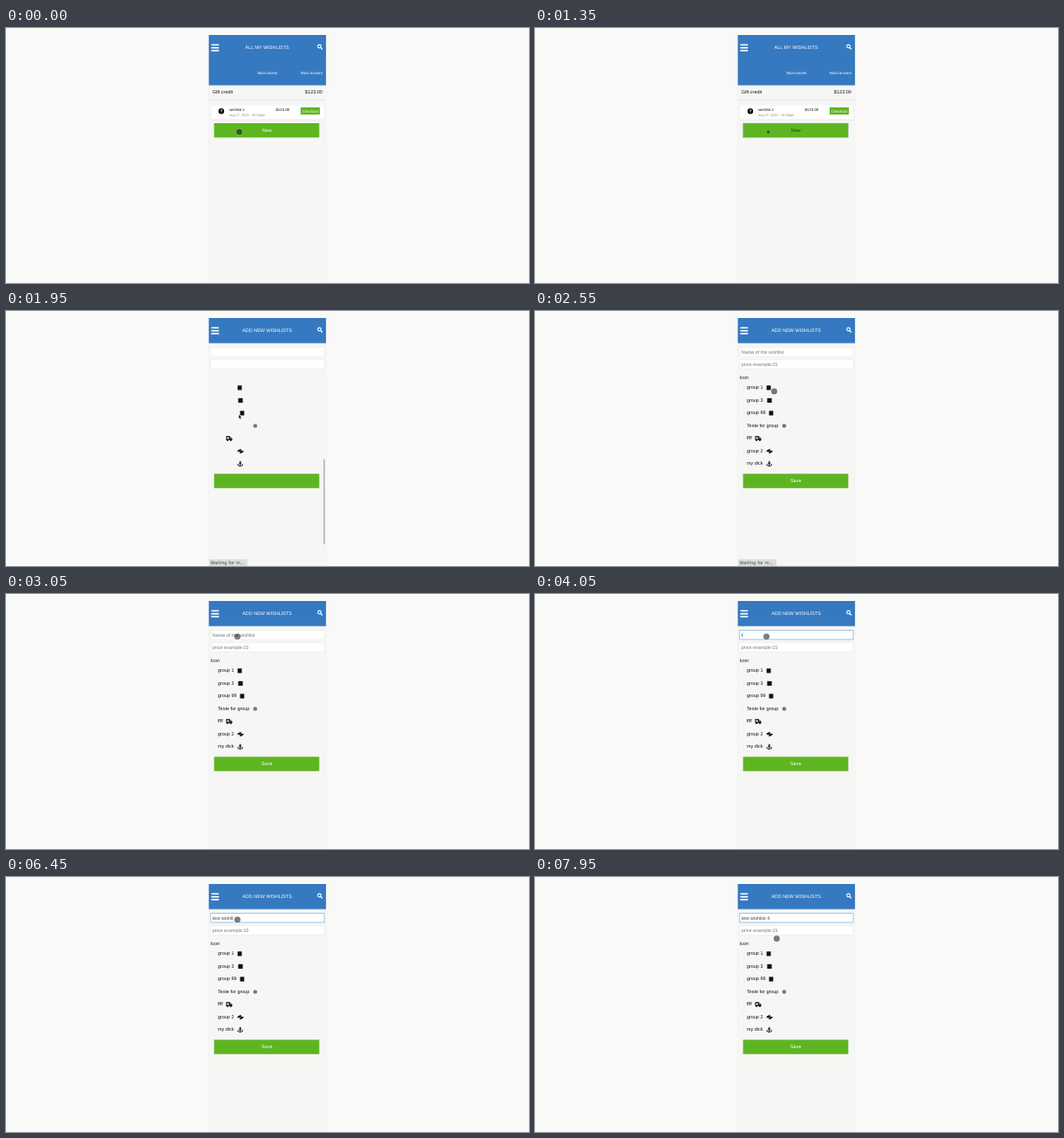
Write an HTML page that moves like this. It is 600 px wide and 292 px high and loops after 8 s.

```html
<!DOCTYPE html>
<html lang="en">
<head>
<meta charset="utf-8">
<title>Wishlists</title>
<style>
  html, body { margin: 0; width: 100%; height: 100%; overflow: hidden; background: #f9f9f7; }
  svg { display: block; width: 600px; height: 292px; }
  text { font-family: "Liberation Sans", Arial, sans-serif; white-space: pre; text-rendering: geometricPrecision; }
</style>
</head>
<body>
<svg id="stage" viewBox="0 0 600 292" xmlns="http://www.w3.org/2000/svg"></svg>
<script>
const LOOP = 8000, FONT = 5.48;
const BLUE = '#3679c1', GREEN = '#5eb522', PAGE = '#f6f6f4', INK = '#111';

const rect = (x, y, w, h, fill, more = '') =>
  `<rect x="${x}" y="${y}" width="${w}" height="${h}" fill="${fill}" ${more}/>`;
const text = (x, y, str, fill = INK, size = FONT, more = '') =>
  `<text x="${x}" y="${y}" font-size="${size}" fill="${fill}" ${more}>${str}</text>`;
const centred = 'text-anchor="middle"';
const toRight = 'text-anchor="end"';

// Icons are drawn around their own centre
const icons = {
  square: rect(-2.4, -2.6, 4.8, 5.2, INK),
  wide: rect(-2.6, -2.6, 5.2, 5.2, INK),
  ring: '<circle r="2.3" fill="#777"/>',
  ambulance: `<path d="M-3.7-2.7H.8V-1.5H2L3.4 0V1.8H-3.7Z" fill="${INK}"/>
    <path d="M-1.5-2V1M-3 -.5H0" stroke="#fff" stroke-width=".8"/>
    <path d="M1.2-.8H1.8L2.6 .1H1.2Z" fill="#fff"/>
    <circle cx="-2" cy="1.9" r="1" fill="${INK}"/><circle cx="1.8" cy="1.9" r="1" fill="${INK}"/>`,
  hands: `<g fill="none" stroke="${INK}" stroke-width="1" stroke-linecap="round">
    <path d="M-3.2 .3L-1.6-1.5L.3-2.1M-1.2-.9L.6-.9M-1.6 0L.1 .3M3.2-.3L1.6 1.5L-.3 2.1M1.2 .9L-.4 1.2M1.6 0L.6-.2"/>
    <circle cx="-1.9" cy="-.4" r=".8" fill="${INK}"/><circle cx="1.9" cy=".4" r=".8" fill="${INK}"/></g>`,
  anchor: `<g fill="none" stroke="${INK}" stroke-width=".95">
    <circle cy="-2" r=".8"/><path d="M0-1.2V2.5M-1.5-.3H1.5M-2.7 .8C-2.4 3.1 2.4 3.1 2.7 .8"/></g>
    <path d="M-3.4 1.3L-2.6-.2L-1.6 1.3ZM3.4 1.3L2.6-.2L1.6 1.3Z" fill="${INK}"/>`
};

const rows = [
  ['group 1', 'square', 268.1], ['group 3', 'wide', 269],
  ['group 99', 'square', 270.9], ['Teste for group', 'ring', 285.9],
  ['ffff', 'ambulance', 256.2], ['group 2', 'hands', 269], ['my dick', 'anchor', 268.7]
];
const rowY = i => 87.7 + 14.53 * i;

const header = (title, h) =>
  rect(232.7, 8, 134.4, h, BLUE, 'filter="url(#soft)"') +
  [18.4, 21.7, 25].map(y => rect(235.5, y, 8.8, 1.7, '#fff', 'rx=".5"')).join('') +
  text(299.6, 24.2, title, '#fff', FONT, centred) +
  `<g fill="none" stroke="#fff"><circle cx="359.6" cy="21" r="1.9" stroke-width="1.1"/>
   <path d="M361 22.4L362.6 24" stroke-width="1.3" stroke-linecap="round"/></g>`;

const listPage =
  rect(232.7, 65, 134.4, 16.8, PAGE, 'filter="url(#soft)"') +
  header('ALL MY WISHLISTS', 57.5) +
  text(288.4, 52.5, 'Most recent', '#fff', 4.4) +
  text(363, 52.5, 'Most ancient', '#fff', 4.4, toRight) +
  text(236.8, 75.3, 'Gift credit') +
  text(362.9, 75.3, '$123.00', INK, FONT, toRight) +
  rect(235.6, 88.6, 129, 16, '#fff', 'filter="url(#soft)"') +
  '<circle cx="247" cy="95.3" r="3.2" fill="#000"/>' +
  text(247, 97.2, '?', '#fff', 5.2, centred + ' font-weight="bold"') +
  text(256.2, 95.2, 'wishlist z', INK, 4.4) +
  text(256.2, 100.7, 'aug 27, 2020 - 04:00pm', '#8a8a8a', 3.87) +
  text(309.4, 95.3, '$123.00', INK, 4.4) +
  rect(338, 90.8, 22, 8.3, GREEN) +
  text(349, 96.5, 'Checkout', '#fff', 4.4, centred) +
  rect(238.7, 109, 120.7, 16.4, GREEN, 'id="newBtn"') +
  text(299.2, 119, 'New', '#fff', FONT, centred + ' id="newText"');

const field = (y, id) =>
  rect(234.8, y, 130.3, 10.4, '#fff', `id="${id}" stroke="#e6e6e4" stroke-width=".5"`);

const formPage =
  rect(232.7, 37, 134.4, 255, PAGE) +
  field(41.6, 'nameBox') + field(55.9, 'priceBox') +
  rows.map(([, icon, x], i) =>
    rect(234.9, rowY(i) - 1.9, 4.1, 4.1, '#fcfcfc', 'stroke="#dededc" stroke-width=".4" rx=".5"') +
    `<g transform="translate(${x} ${rowY(i) + .2})">${icons[icon]}</g>`).join('') +
  rect(238.7, 186.4, 120.7, 16.4, GREEN);

const formText =
  text(236.7, 62.9, 'price example:15', '#777') +
  text(234.8, 77.6, 'Icon') +
  rows.map(([label], i) => text(242.9, rowY(i) + 1.6, label)).join('') +
  text(299.2, 196.4, 'Save', '#fff', FONT, centred);

document.getElementById('stage').innerHTML = `
  <defs>
    <filter id="soft" x="-5%" y="-20%" width="110%" height="150%">
      <feDropShadow dx="0" dy=".4" stdDeviation=".7" flood-color="#000" flood-opacity=".16"/>
    </filter>
    <clipPath id="cut"><rect id="cutBox" x="232" y="0" width="136" height="292"/></clipPath>
  </defs>
  ${rect(0, 0, 600, 292, '#f9f9f7')}
  ${rect(232.7, 8, 134.4, 300, PAGE, 'filter="url(#soft)"')}
  <g id="list">${listPage}</g>
  <g id="form" clip-path="url(#cut)">${formPage}
    <g id="formText">${formText}${text(236.7, 48.5, '', '#777', FONT, 'id="name"')}
      ${rect(0, 44.2, .4, 5.4, '#999', 'id="caret"')}</g>
  </g>
  <g id="formHead">${header('ADD NEW WISHLISTS', 28.7)}</g>
  ${rect(364.5, 169.5, 1, 97.5, '#8c8c8a', 'id="bar" rx=".5"')}
  <g id="status">
    <path d="M233 292V284.3H275.6Q277 284.3 277 285.7V292Z" fill="#dcdddd"/>
    <text id="statusText" x="234.6" y="290.2" font-size="5.05" fill="#444"
      style="font-family:'DejaVu Sans',sans-serif"></text>
  </g>
  <g id="dot">
    <circle r="3.9" fill="none" stroke="#fff" stroke-opacity=".4" stroke-width=".6"/>
    <circle r="3.3" fill="#141414" fill-opacity=".55" stroke="#141414" stroke-opacity=".4" stroke-width=".5"/>
  </g>
  <path id="arrow" d="M267.1 118.8V123.2L268.2 122.3L269 124L269.8 123.6L269 122L270.4 121.9Z"
    fill="#111" stroke="#fff" stroke-opacity=".6" stroke-width=".3"/>`;

const $ = id => document.getElementById(id);
const show = (id, on) => $(id).setAttribute('display', on ? 'inline' : 'none');
const set = (id, key, value) => $(id).setAttribute(key, value);

const message = 'test wishlist 4';
const keyTimes = [4050, 4150, 4350, 4450, 4950, 5750, 5800, 5950, 6050,
  6250, 6450, 6550, 6600, 6750, 7000];

// time, x, y of the pointer
const path = [
  [0, 267.6, 119], [2300, 267.6, 119], [2550, 274.4, 92], [2700, 270, 41],
  [2850, 268.4, 54.4], [2950, 268.4, 54.4], [3050, 265.5, 48.7],
  [7500, 265.5, 48.7], [7800, 274.2, 90.3], [7949, 274.2, 90.3],
  [7950, 277.3, 70.6], [LOOP, 277.3, 70.6]
];

function pointerAt(t) {
  const i = path.findIndex(p => p[0] > t);
  const [a, b] = [path[i - 1], path[i]];
  const k = (t - a[0]) / (b[0] - a[0]);
  return [a[1] + (b[1] - a[1]) * k, a[2] + (b[2] - a[2]) * k];
}

function draw(time) {
  const t = Math.floor(time / 50) * 50;
  const pressed = t >= 1250, form = t >= 1950, focus = t >= 3600;

  show('list', !form);
  show('form', t >= 1850);
  show('formHead', form);
  show('formText', t >= 2050);
  set('cutBox', 'y', form ? 0 : 170);

  set('newText', 'fill', pressed ? '#1d4a0c' : '#fff');
  set('newBtn', 'stroke', pressed ? '#9fc6b4' : 'none');
  set('newBtn', 'stroke-width', .6);

  show('bar', t >= 1850 && t < 2500);
  set('bar', 'opacity', Math.min(1, Math.max(0, (2500 - t) / 200)));
  show('status', t >= 1400 && t < 2800);
  $('statusText').textContent = t < 1550 ? 'Waiting for ...' : 'Waiting for m...';

  const count = keyTimes.filter(k => k <= t).length;
  $('name').textContent = count ? message.slice(0, count) : 'Name of the wishlist';
  set('name', 'fill', count ? '#444' : '#777');
  set('nameBox', 'stroke', focus ? '#86b7e6' : '#e6e6e4');
  set('nameBox', 'stroke-width', focus ? .8 : .5);
  show('caret', focus && t < 7000);
  set('caret', 'x', 236.9 + (count ? $('name').getComputedTextLength() : 0));

  const arrow = t >= 1400 && t < 2350;
  const [x, y] = pointerAt(t);
  const size = t >= 1200 && t < 1400 ? 1 - (t - 1150) / 400 : 1;
  show('arrow', arrow);
  show('dot', !arrow);
  set('dot', 'transform', `translate(${x} ${y}) scale(${size})`);
}

const start = performance.now();
function tick() {
  draw((performance.now() - start) % LOOP);
  requestAnimationFrame(tick);
}
draw(0);
requestAnimationFrame(tick);
</script>
</body>
</html>
```
